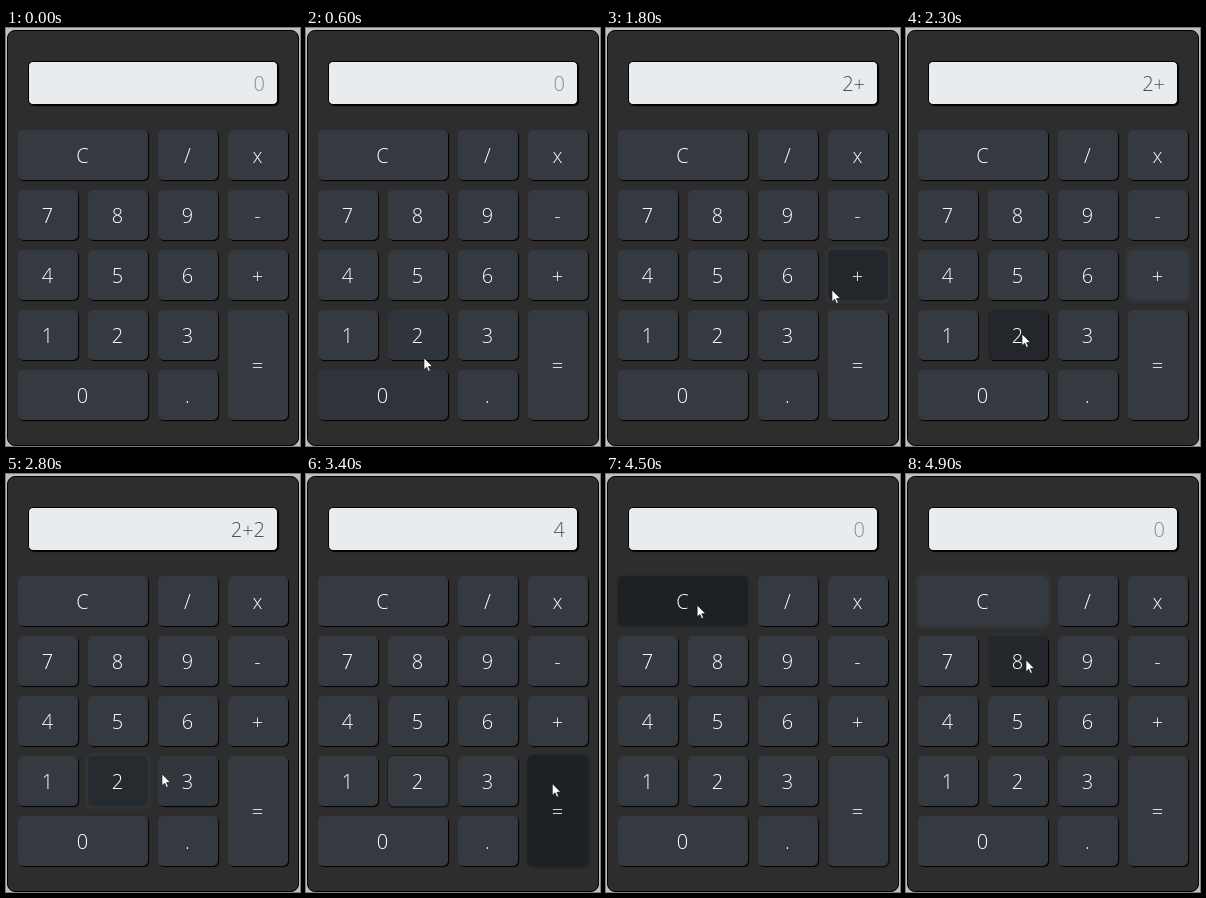
An HTML page for the animation above (5 s loop, 294 by 418 pixels).

```html
<!DOCTYPE html>
<html lang="en">
<head>
<meta charset="utf-8">
<title>Calculator</title>
<style>
  html, body { margin: 0; width: 100%; height: 100%; overflow: hidden; background: #bdbfc1; }
  body { position: relative; font: 350 20px "Open Sans", "Noto Sans", sans-serif; }
  div, svg { position: absolute; box-sizing: border-box; }
  #case { left: 1px; top: 2px; width: 292px; height: 416px; background: #2d2d2d; border: 1px solid #000; border-radius: 8px; }
  #display { left: 22px; top: 33px; width: 250px; height: 44px; line-height: 44px; padding-right: 12px; text-align: right;
    background: #e9ecef; border: 1px solid #000; border-radius: 5px; box-shadow: 1px 1px 1px #000; }
  .key { color: #fff; text-align: center; text-indent: -1px; border-radius: 5px; }
  #cursor { left: 0; top: 0; overflow: visible; }
</style>
</head>
<body>
<div id="case"></div>
<div id="display"></div>
<svg id="cursor" width="10" height="16"><path d="M0 0V11.6L2.7 9.2L4.5 13.4L6.3 12.6L4.5 8.6L8.2 8.3Z" fill="#fff" stroke="#111" stroke-width=".6"/></svg>
<script>
const LOOP = 5000, STEP = 100, FADE = 150, SAMPLES = 15;
const display = document.getElementById("display");
const cursor = document.getElementById("cursor");

// A repeated label spans several cells
const layout = ["CC/x", "789-", "456+", "123=", "00.="];
const keys = [...new Set(layout.join(""))].map(label => {
  const rows = layout.filter(r => r.includes(label));
  const row = layout.indexOf(rows[0]), col = rows[0].indexOf(label);
  const key = {
    label, x: 12 + 70 * col, y: 102 + 60 * row,
    w: 70 * (rows[0].lastIndexOf(label) - col + 1) - 10, h: 60 * rows.length - 10
  };
  key.el = document.createElement("div");
  key.el.className = "key";
  key.el.textContent = label;
  key.el.style.cssText = `left:${key.x}px;top:${key.y}px;width:${key.w}px;height:${key.h}px;line-height:${key.h + 2}px`;
  document.body.insertBefore(key.el, cursor);
  return key;
});

const clicks = [[850, "2"], [1500, "+"], [2550, "2"], [3320, "="], [4400, "C"]];

// time, x, y of the pointer tip at each stop
const stops = [
  [300, 80, 385], [600, 118, 330], [900, 117, 322], [1200, 228, 260], [1800, 226, 262],
  [2300, 116, 306], [2750, 118, 304], [2800, 156, 300], [3200, 246, 310], [3700, 247, 309],
  [3900, 150, 234], [4000, 152, 197], [4250, 88, 128], [4600, 92, 132], [4900, 120, 186], [LOOP, 120, 186]
];

const mix = (a, b, k) => a + (b - a) * k;
const ease = k => k * k * (3 - 2 * k);

function pointer(t) {
  const i = stops.findIndex(s => s[0] > t);
  if (i < 1) return null;
  const [t0, x0, y0] = stops[i - 1], [t1, x1, y1] = stops[i];
  const k = ease((t - t0) / (t1 - t0));
  return [mix(x0, x1, k), mix(y0, y1, k)];
}

const inside = (p, { x, y, w, h }) => p && p[0] >= x && p[0] < x + w && p[1] >= y && p[1] < y + h;
const lastClick = t => clicks.filter(c => c[0] <= t).pop();

function press(text, key) {
  if (key === "C") return "";
  if (key === "=") return String(text.split("+").reduce((sum, n) => sum + Number(n), 0));
  return text + key;
}

function draw(t) {
  const recent = Array.from({ length: SAMPLES }, (_, i) => t - i * FADE / SAMPLES);
  const tips = recent.map(pointer), pressed = recent.map(lastClick);
  const click = pressed[0];

  for (const key of keys) {
    // Averaging the recent states gives the fade in and out
    const hover = tips.filter(p => inside(p, key)).length / SAMPLES;
    const focus = pressed.filter(c => c && c[1] === key.label).length / SAMPLES;
    const active = click && click[1] === key.label && t - click[0] < 120;
    key.el.style.background = active ? "#1d2124"
      : `rgb(${mix(52, 35, hover)},${mix(58, 39, hover)},${mix(64, 43, hover)})`;
    key.el.style.boxShadow = `${1 - focus}px ${1 - focus}px ${1 - focus}px ${3.2 * focus}px ` +
      `rgba(${52 * focus},${58 * focus},${64 * focus},${1 - focus / 2})`;
  }

  const text = clicks.filter(c => c[0] <= t).reduce((s, c) => press(s, c[1]), "");
  display.textContent = text || "0";
  display.style.color = text ? "#495057" : "#868e96";

  const tip = tips[0];
  cursor.style.display = tip ? "block" : "none";
  if (tip) cursor.style.transform = `translate(${tip[0]}px,${tip[1]}px)`;
}

const start = performance.now();
function tick() {
  const t = (performance.now() - start) % LOOP;
  draw(Math.floor(t / STEP) * STEP);
  requestAnimationFrame(tick);
}
tick();
</script>
</body>
</html>
```
